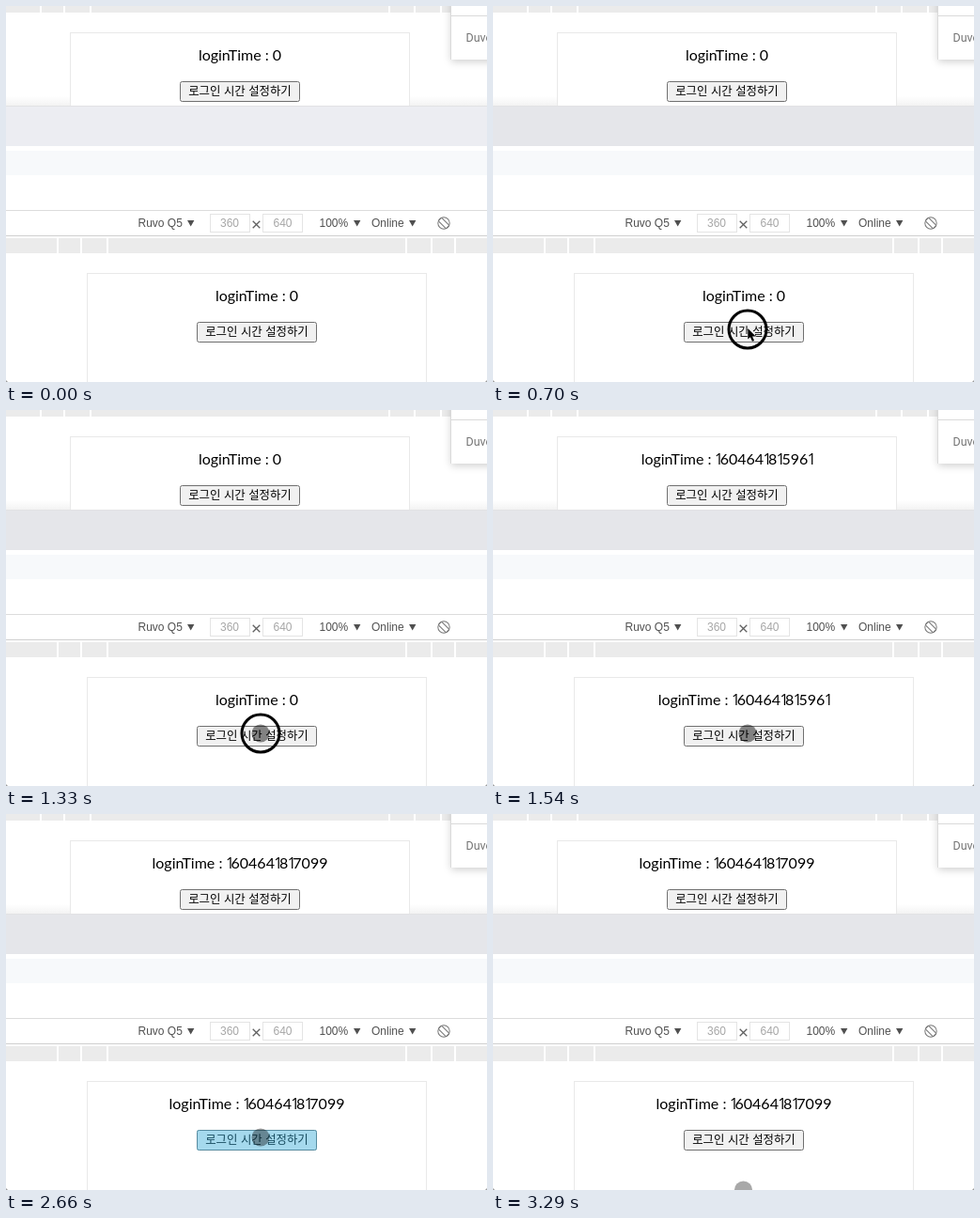
These frames come from a looping animation (512x400 px, 3.36 s). An HTML page:

```html
<!DOCTYPE html>
<html lang="ko">
<head>
<meta charset="utf-8">
<title>loginTime</title>
<style>
  html, body { margin: 0; width: 100%; height: 100%; overflow: hidden; background: #fff; }
  svg { display: block; width: 512px; height: 400px; }
  .time { font: 16px Lato, sans-serif; text-anchor: middle; white-space: pre; }
  .one { font-family: "Open Sans", sans-serif; letter-spacing: -3.5px; }
  .label { font: 12.4px "Noto Sans CJK KR", "Noto Sans CJK", sans-serif; text-anchor: middle; }
  .tool { font: 12px "Liberation Sans", Arial, sans-serif; fill: #505050; }
  .pale { fill: #a6a6a6; }
  .popup { font: 12.5px Roboto, sans-serif; fill: #757575; }
  .card { fill: #fff; stroke: #e9e9e9; }
  .button { fill: #f1f1f1; stroke: #707070; }
  .field { fill: #fff; stroke: #e4e4e4; }
</style>
</head>
<body>
<svg viewBox="0 0 512 400">
  <defs>
    <linearGradient id="shade" x1="0" y1="0" x2="0" y2="1">
      <stop offset="0" stop-color="#fff"/>
      <stop offset="1" stop-color="#f3f3f3"/>
    </linearGradient>
    <filter id="soft" x="-50%" y="-50%" width="200%" height="200%">
      <feDropShadow dx="0" dy="2" stdDeviation="4.5" flood-color="#000" flood-opacity=".2"/>
    </filter>
  </defs>
  <rect width="512" height="400" fill="#fff"/>

  <!-- upper window -->
  <g id="ruler1"></g>
  <rect y="96" width="512" height="10" fill="url(#shade)"/>
  <g id="page1"></g>
  <g filter="url(#soft)"><rect x="474" y="-20" width="60" height="77" fill="#fff"/></g>
  <path d="M473.5 0V57M474 10.5H512" stroke="#dadada" fill="none"/>
  <text class="popup" x="489.5" y="38">Duvel</text>

  <!-- lower window -->
  <rect y="106" width="512" height="294" fill="#fff"/>
  <rect id="strip" y="107" width="512" height="42"/>
  <path d="M0 106.5H512" stroke="#e2e2e4"/>
  <rect y="154" width="512" height="26" fill="#f7f9fb"/>
  <path d="M0 217.5H512" stroke="#dcdcdc"/>
  <path d="M0 244.5H512" stroke="#cfcfcf"/>
  <g class="tool">
    <text x="140.5" y="235">Ruvo Q5</text>
    <text x="333.5" y="235">100%</text>
    <text x="389" y="235">Online</text>
    <path d="M193 228h7.4l-3.7 6.6zM370 228h7.4l-3.7 6.6zM429 228h7.4l-3.7 6.6z"/>
    <rect class="field" x="217.5" y="221.5" width="42" height="19"/>
    <rect class="field" x="273.5" y="221.5" width="42" height="19"/>
    <text class="pale" x="228" y="235">360</text>
    <text class="pale" x="284.5" y="235">640</text>
    <path d="M262.7 228.7l7.6 7.6m0-7.6l-7.6 7.6" stroke="#606060" stroke-width="1.3"/>
  </g>
  <g transform="translate(466 231) rotate(-45)" fill="#fff" stroke="#777">
    <circle r="6.2"/>
    <rect x="-2.4" y="-5.8" width="4.8" height="11.6" rx="1"/>
  </g>
  <g id="ruler2"></g>
  <g id="page2"></g>
  <path d="M0 398l2 2H0zM512 398l-2 2h2z" fill="#999"/>

  <!-- pointer -->
  <rect id="flash" x="203" y="336" width="128" height="22" rx="2" fill="#33b5e5" fill-opacity=".4"/>
  <circle id="touch" r="9.6"/>
  <circle id="ring" cx="271" cy="344" r="20" fill="none" stroke="#000" stroke-width="3"/>
  <path id="arrow" d="M0 0V11.6L2.6 9.2L4.6 13.8L6.8 12.9L4.8 8.4H8.4Z" stroke="#fff" paint-order="stroke"/>
</svg>
<script>
const $ = id => document.getElementById(id);
const LOOP = 3360;

// Each row: start time in ms, then the value held from there on.
const steps = {
  strip: [[0, '#ecedf2'], [70, '#ecedee'], [630, '#e5e6ea']],
  value: [[0, '0'], [1400, '1604641815961'], [2660, '1604641817099']],
  ring: [[0, false], [700, true], [910, false], [1330, true], [1400, false], [2520, true], [2660, false]],
  flash: [[0, false], [1400, true], [1540, false], [2660, true], [2800, false]],
  arrow: [[0, null], [490, [265.3, 369]], [560, [268, 359]], [630, [270.5, 348]], [700, [271.3, 343]], [1330, null]],
  touch: [[0, null], [1330, [271, 344, .46]], [2520, [271, 344, .38]], [2800, [271, 349, .34]],
    [2870, [271, 362, .34]], [2940, [271, 376.5, .34]], [3010, [271, 390, .34]],
    [3080, [270, 397, .34]], [3220, [268.5, 398.5, .34]], [3290, [266.5, 400, .34]]]
};

const held = (rows, t) => rows.findLast(row => row[0] <= t)[1];
const show = (el, on) => { el.style.display = on ? '' : 'none'; };

function ruler(id, y, height, marks) {
  $(id).innerHTML = `<rect y="${y}" width="512" height="${height}" fill="#ebebeb"/>` +
    marks.map(x => `<rect x="${x}" y="${y}" width="2" height="${height}" fill="#fff"/>`).join('');
}

function page(id, x, y, height) {
  $(id).innerHTML = `<rect class="card" x="${x + .5}" y="${y + .5}" width="361" height="${height}"/>
    <text class="time" x="${x + 181}" y="${y + 30}"></text>
    <rect class="button" x="${x + 117.5}" y="${y + 52.5}" width="127" height="21" rx="2"/>
    <text class="label" x="${x + 181}" y="${y + 66.5}">로그인 시간 설정하기</text>`;
}

ruler('ruler1', 0, 7, [36, 61, 89, 407, 434, 462]);
ruler('ruler2', 247, 16, [54, 79, 107, 425, 452, 477]);
page('page1', 68, 28, 90);
page('page2', 86, 284, 130);

const times = document.querySelectorAll('.time');
let shown;

function setValue(value) {
  if (value === shown) return;
  shown = value;
  // The digit one is set narrower than the rest.
  const digits = value.replace(/1/g, '<tspan class="one" dx="-.6">1</tspan>');
  times.forEach(el => { el.innerHTML = 'loginTime : ' + digits; });
}

function draw(now) {
  const t = now % LOOP;
  const arrow = held(steps.arrow, t);
  const touch = held(steps.touch, t);
  setValue(held(steps.value, t));
  $('strip').setAttribute('fill', held(steps.strip, t));
  show($('ring'), held(steps.ring, t));
  show($('flash'), held(steps.flash, t));
  show($('arrow'), arrow);
  show($('touch'), touch);
  if (arrow) $('arrow').setAttribute('transform', `translate(${arrow})`);
  if (touch) {
    const [x, y, alpha] = touch;
    $('touch').setAttribute('transform', `translate(${x} ${y})`);
    $('touch').setAttribute('fill-opacity', alpha);
  }
}

const start = performance.now();
function tick() {
  draw(performance.now() - start);
  requestAnimationFrame(tick);
}
tick();
</script>
</body>
</html>
```
